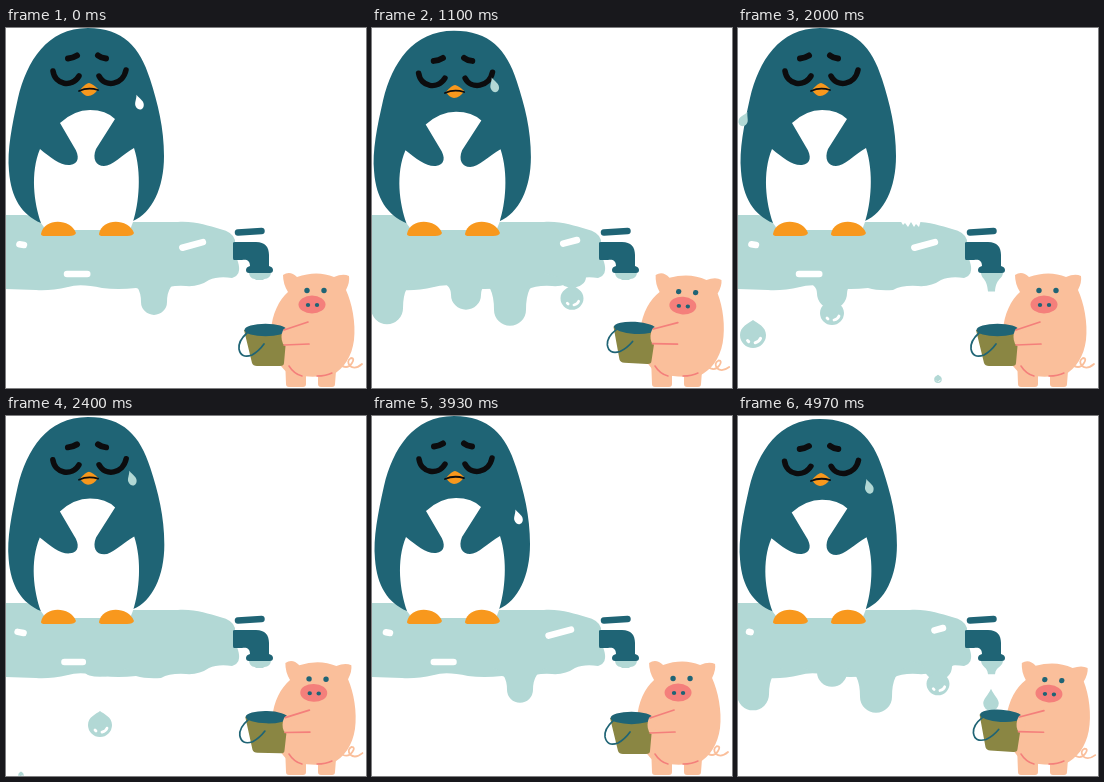
These frames come from a looping animation (360x360 px, 5 s). An HTML page with a canvas:

```html
<!DOCTYPE html>
<html lang="en">
<head>
<meta charset="utf-8">
<title>Dripping tears</title>
<style>
html, body { margin: 0; width: 100%; height: 100%; overflow: hidden; background: #fff; }
canvas { display: block; width: 360px; height: 360px; }
</style>
</head>
<body>
<canvas id="stage" width="360" height="360"></canvas>
<script>
const LOOP = 5000;
const TEAL = '#1f6475', WATER = '#b2d8d5', ORANGE = '#f8981d', BLACK = '#0c0c0e',
      SKIN = '#fabf9b', ROSE = '#f47f7b', OLIVE = '#8a8643', WHITE = '#fff';
const c = document.getElementById('stage').getContext('2d');
c.lineCap = c.lineJoin = 'round';

const wrap = (t, period) => ((t % period) + period) % period;
const easeOut = (p, power) => 1 - (1 - p) ** power;

function fill(d, color) {
  c.fillStyle = color;
  c.fill(new Path2D(d));
}
function line(d, color, width) {
  c.strokeStyle = color;
  c.lineWidth = width;
  c.stroke(new Path2D(d));
}
function oval(x, y, rx, ry, color) {
  c.fillStyle = color;
  c.beginPath();
  c.ellipse(x, y, rx, ry, 0, 0, 7);
  c.fill();
}
function within(draw) {
  c.save();
  draw();
  c.restore();
}
function tear(x, y, color, turn, sx, sy = sx) {
  within(() => {
    c.translate(x, y);
    c.rotate(turn);
    c.scale(sx, sy);
    fill('M0-7.5C2-3 5-1 5 2A5 5 0 0 1-5 2C-5-1-2-3 0-7.5Z', color);
  });
}

// Each drip swells for `grow` ms, shrinks back and lets a drop go for `fall` ms.
const DRIPS = [
  { x: 15, base: 256, w: 16, len: 41, start: 450, grow: 1050, fall: 950, r: 13 },
  { x: 94, base: 256, w: 15, len: 41, start: 850, grow: 1150, fall: 740, r: 12 },
  { x: 138, base: 256, w: 16, len: 42, start: 450, grow: 900, fall: 625, r: 13 },
  { x: 148, base: 256, w: 13, len: 31, start: 3000, grow: 1300, fall: 480, r: 12 },
  { x: 200, base: 249, w: 14, len: 30, start: 100, grow: 800, fall: 1200, r: 11.5 }
];

function drip({ x, base, w, len, start, grow, fall, r }, t) {
  const u = wrap(t - start, 4000), after = u - grow;
  const size = len * (after < 0 ? easeOut(u / grow, 4) : .6 * Math.max(0, 1 - after / 500));
  if (size > 0) {
    const b = base + size, y = Math.max(base, b - w);
    fill(`M${x - w - 14} ${base - 4}Q${x - w} ${base} ${x - w} ${y}A${w} ${b - y} 0 0 0 ${x + w} ${y}`
      + `Q${x + w} ${base} ${x + w + 14} ${base - 4}Z`, WATER);
  }
  const p = after / fall;
  if (p < 0 || p >= 1) return;
  const top = base + len - r;
  within(() => {
    c.translate(x, top + (367 - top) * p * p);
    const s = r / 12 * Math.min(1, (1 - p) * 4);
    c.scale(s, s);
    fill('M0-14C4-11 12-8 12 0A12 12 0 0 1-12 0C-12-8-4-11 0-14Z', WATER);
    line('M7 3Q6 6 2 7M-5 5L-4 6', WHITE, 2.8);
  });
}

// A shine runs left: its head leaves early, its tail catches up late.
function shine(t, start, life, from, to, y, slope) {
  const p = wrap(t - start, 2000) / life;
  if (p >= 1) return;
  const head = (to - from) * easeOut(p, 3), tail = (to - from) * p ** 5;
  line(`M${from + head} ${y + slope * head}L${from + tail} ${y + slope * tail}`, WHITE, 6.5);
}

function puddle(t) {
  fill('M0 187H20L60 194H172C190 193 202 198 214 201Q227 204 229 212Q228 224 232 234Q236 247 226 250'
    + 'Q212 248 203 252Q193 259 180 258Q164 257 155 262Q140 263 130 260Q112 262 96 260Q74 255 62 259'
    + 'Q44 263 30 262L0 261Z', WATER);
  DRIPS.forEach(d => drip(d, t));
  shine(t, 800, 1550, 205, 176, 212, -.27);
  shine(t, 1150, 1700, 82, 58, 246, 0);
  shine(t, 1550, 1500, 18, 11, 217, .17);
}

function rightTear(u, behind) {
  if (u > 750 || behind !== u > 440) return;
  const x = 122 + .072 * u, y = 57 + .1 * u + .0001 * u * u;
  if (behind) tear(x, y, WATER, -.15, .75, 1);
  else tear(x, y, u > 135 ? WHITE : WATER, -.3, .85, 1.05);
}
function leftTear(u) {
  if (u < 650) tear(43.5 - .085 * u, 51.5 + .09 * u, WATER, .45, .9, 1.05);
}

function penguin(k) {
  within(() => {
    c.translate(80, 207);
    c.scale(1 + .012 * k, 1 - .014 * k);
    c.translate(-80, -207);
    fill('M82 0C41 0 21 33 12 70C6 97 1 122 3 143C5 170 16 187 35 195L127 193C146 185 158 160 158 128'
      + 'C158 100 152 76 144 51C134 19 117 0 82 0Z', TEAL);
    fill('M54 95Q68 82 84 82Q100 82 109 91L90 121C86 131 90 138 98 138C106 138 116 127 128 120'
      + 'C136 145 133 175 127 194L124 202H40L35 195C28 175 24 145 34 121C45 130 55 138 64 137'
      + 'C73 136 74 128 68 119Z', WHITE);
    line('M47 43C49 57 66 60 73 48M93 48C99 60 117 57 120 42', BLACK, 5.5);
    line('M62 30.5Q67 30 71 27.5M92 27.5Q95 30 100 30.5', BLACK, 6);
    fill('M74 62Q80 55 83 55Q87 56 92 61Q88 68 82 68Q78 68 74 62Z', ORANGE);
    line('M73 63Q82 59 92 62', BLACK, 1.8);
  });
  for (const x of [35, 93])
    fill(`M${x} 206C${x + 3} 190 ${x + 29} 190 ${x + 35} 205Q${x + 34} 208 ${x + 28} 208H${x + 4}Q${x} 208 ${x} 206Z`, ORANGE);
}

function tap(t) {
  const u = wrap(t, 1440);
  const low = 252 + 12 * Math.max(0, Math.min((u - 330) / 240, (740 - u) / 170));
  fill(`M243 245C244 252 249 250 250 ${low}H257C258 250 264 252 265 245Z`, WATER);
  if (u > 570 && u < 730) tear(253, 264 + (u - 570) / 4, WATER, 0, 1.55);
  line('M232 204.5L255.5 203', TEAL, 6.5);
  fill('M227 215Q227 214 229 214H250C259 214 263 219 263 227V238Q267 239 267 242Q267 245 264 245H243'
    + 'Q240 245 240 242Q240 239 244 238C244 232 240 231 236 232H228Q227 232 227 230Z', TEAL);
}

function pig(k) {
  fill('M279 330H300V356Q300 359 297 359H283Q280 359 280 356Z', SKIN);
  fill('M312 330H331L329 356Q329 359 326 359H315Q312 359 312 356Z', SKIN);
  within(() => {
    c.translate(313, 358);
    c.rotate(.062 * k);
    c.scale(1, 1 - .018 * k);
    c.translate(-313, -358);
    line('M332 335Q341 343 346 335Q349 330 345 330Q340 333 344 338Q349 342 356 336', SKIN, 1.8);
    fill('M277 247Q284 242 291 249Q311 242 328 249Q337 245 343 248Q344 254 340 262C346 275 350 295 348 312'
      + 'C346 328 338 341 326 347Q304 351 283 346C271 337 264 320 265 303C266 286 273 272 282 264'
      + 'Q277 256 277 247Z', SKIN);
    for (const x of [301, 318]) oval(x, 262.5, 2.7, 2.7, TEAL);
    oval(306, 276.5, 13.5, 9, ROSE);
    for (const x of [302, 311]) oval(x, 277, 2.2, 2, TEAL);
    fill('M238 302L246 335Q247 338 251 338H274Q278 338 278 335L281 301Z', OLIVE);
    oval(259.5, 302, 21, 6.2, TEAL);
    line('M241 305Q232 313 233 321Q235 331 246 327Q253 323 258 316', TEAL, 1.7);
    oval(280, 309, 4.5, 9, SKIN);
    line('M278 302L302 294M278 317L303 316', ROSE, 1.7);
  });
  line('M283 338Q288 346 296 348M311 348Q320 348 326 345', ROSE, 1.5);
}

function draw() {
  const t = performance.now() % LOOP;
  const sway = (1 - Math.cos(t * Math.PI / 1000)) / 2;
  const u = wrap(t + 150, 1250);

  c.fillStyle = WHITE;
  c.fillRect(0, 0, 360, 360);
  puddle(t);
  if (u > 750 && u < 930) fill('M162 192l3 5 2-2 3 4 3-5 3 5 2-3 3 3 2-7z', WHITE);
  rightTear(u, true);
  penguin(sway);
  rightTear(u, false);
  leftTear(wrap(u - 460, 1250));
  tap(t);
  pig(sway);
  requestAnimationFrame(draw);
}
draw();
</script>
</body>
</html>
```
